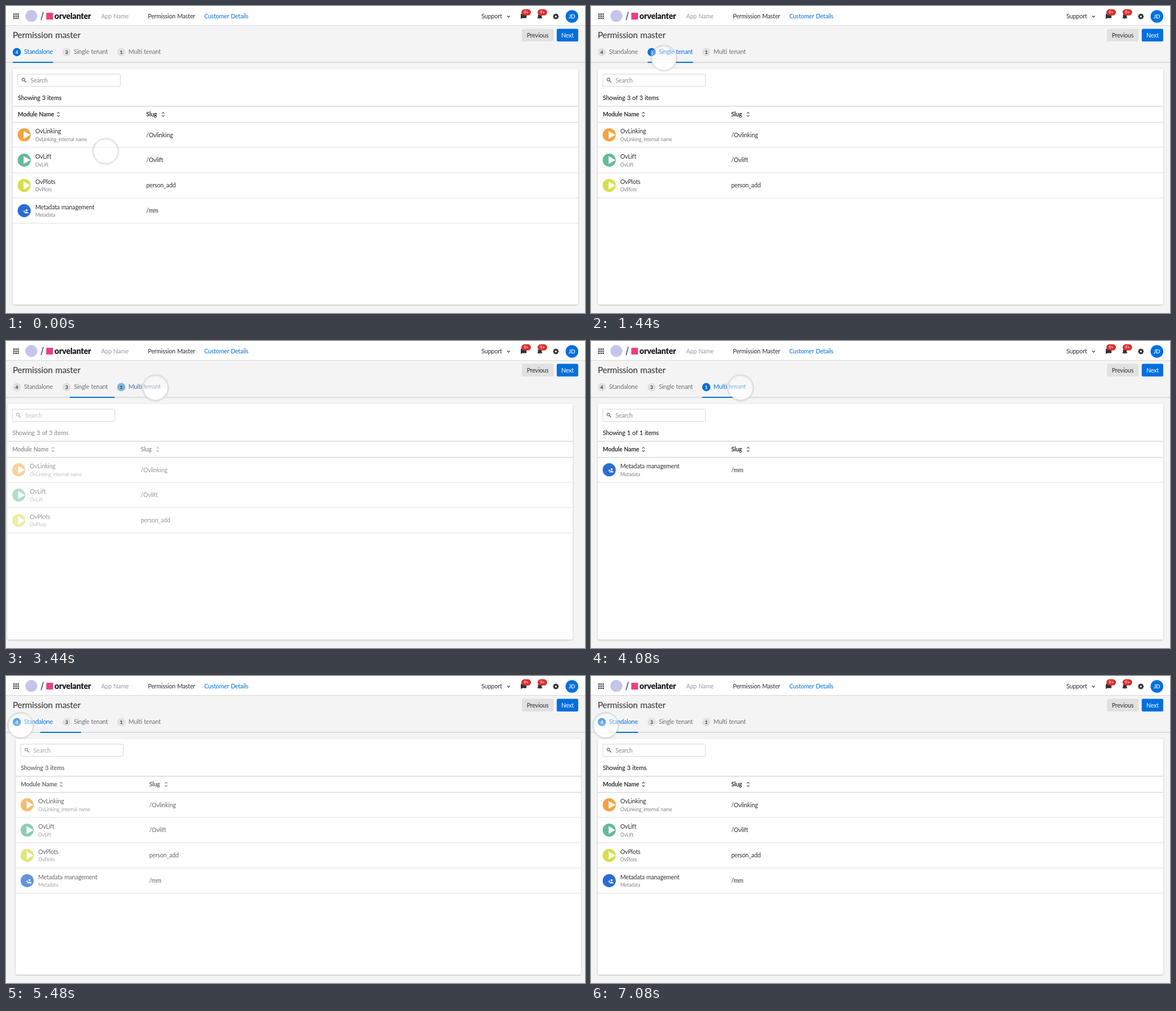
An HTML page for the animation above (7120 ms loop, 1028 by 545 pixels).

```html
<!DOCTYPE html>
<html lang="en">
<head>
<meta charset="utf-8">
<title>Permission master</title>
<style>
  html, body { margin: 0; width: 100%; height: 100%; overflow: hidden; background: #f4f4f4; }
  svg { display: block; width: 1028px; height: 545px; overflow: hidden; }
  text { font-family: Lato, "Open Sans", sans-serif; letter-spacing: -.016em; word-spacing: .07em; white-space: pre; }
  .card { filter: drop-shadow(0 1px 1.5px rgba(0,0,0,.22)); }
  .ring { filter: drop-shadow(0 1px 1px rgba(0,0,0,.25)); }
</style>
</head>
<body>
<svg id="stage" viewBox="0 0 1028 545"></svg>
<script>
const LOOP = 7120, STEP = 40, SWITCH = 400, SLIDE = 19;
const INK = '#2f2f2f', FAINT = '#858585', BLUE = '#0070dd', LINE = '#d8d8d8';

const label = (x, y, s, o = {}) =>
  `<text x="${x}" y="${y}" font-size="${o.size || 10.6}" font-weight="${o.weight || 400}" ` +
  `fill="${o.fill || INK}" text-anchor="${o.anchor || 'start'}">${s}</text>`;
const rect = (x, y, w, h, fill, r = 0, extra = '') =>
  `<rect x="${x}" y="${y}" width="${w}" height="${h}" rx="${r}" fill="${fill}" ${extra}/>`;
const disc = (x, y, r, fill, extra = '') =>
  `<circle cx="${x}" cy="${y}" r="${r}" fill="${fill}" ${extra}/>`;
const path = (d, fill = 'none', stroke = 'none', w = 1) =>
  `<path d="${d}" fill="${fill}" stroke="${stroke}" stroke-width="${w}"/>`;
const at = (x, y, s) => `<g transform="translate(${x} ${y})">${s}</g>`;

const tabs = [
  { name: 'Standalone', count: 4, x: 12, end: 83.5 },
  { name: 'Single tenant', count: 3, x: 100.5, end: 181 },
  { name: 'Multi tenant', count: 1, x: 197.5, end: 272.5 }
];
const modules = [
  { name: 'OvLinking', sub: 'OvLinking_internal name', slug: '/Ovlinking', color: '#f3a440' },
  { name: 'OvLift', sub: 'OvLift', slug: '/Ovlift', color: '#63bb97' },
  { name: 'OvPlots', sub: 'OvPlots', slug: 'person_add', color: '#d4e04c' },
  { name: 'Metadata management', sub: 'Metadata', slug: '/mm', color: '#2b6cd4', person: true }
];
const views = [
  { note: 'Showing 3 items', rows: modules },
  { note: 'Showing 3 of 3 items', rows: modules.slice(0, 3) },
  { note: 'Showing 1 of 1 items', rows: modules.slice(3) }
];

function header() {
  let s = rect(0, 0, 1028, 34, '#fff') + rect(0, 34, 1028, 1, LINE);
  for (let i = 0; i < 9; i++) s += rect(13 + i % 3 * 3.7, 13.2 + (i / 3 | 0) * 3.7, 2.4, 2.4, INK);
  s += disc(45, 17.7, 10.3, '#c5c4ec', 'stroke="#c9cbe0"');
  s += path('M62.3 25L66.3 10.5', 'none', '#333', 1.3);
  s += rect(71.5, 12, 12, 12, '#ee3f80');
  s += label(86, 22.8, 'orvelanter', { size: 14.4, weight: 900, fill: '#1c1c1c' });
  s += label(169, 21.7, 'App Name', { fill: '#9b9b9b' });
  s += label(252, 21.7, 'Permission Master');
  s += label(352, 21.7, 'Customer Details', { fill: BLUE });
  s += label(844, 22.2, 'Support', { size: 10.8 });
  s += path('M889.8 17.3l2.5 2.5 2.5-2.5', 'none', INK, 1.2);
  s += path('M914 14h10v7.5h-8l-2 2z', INK);
  s += path('M943.5 21.8v-1l1-1v-3c0-2 1.3-3 3.3-3s3.3 1 3.3 3v3l1 1v1zM946.6 22.4h2.4l-1.2 1.2z', INK);
  for (const x of [923.5, 952.3]) {
    s += rect(x - 8.5, 5.8, 17, 11, '#d9302f', 5.5);
    s += label(x, 14.2, '9+', { size: 7.6, fill: '#fff', anchor: 'middle' });
  }
  for (let i = 0; i < 4; i++)
    s += rect(975, 13.6, 2.6, 10, INK, .6, `transform="rotate(${i * 45} 976.3 18.6)"`);
  s += disc(976.3, 18.6, 3.8, INK) + disc(976.3, 18.6, 1.7, '#fff');
  s += disc(1004.8, 18.5, 11.3, BLUE);
  s += label(1004.8, 22.1, 'JD', { size: 10, weight: 600, fill: '#fff', anchor: 'middle' });
  s += label(12, 57, 'Permission master', { size: 15.4 });
  s += rect(916, 40.6, 56, 22.5, '#e1e1e1', 2.5) + label(944, 55.6, 'Previous', { anchor: 'middle' });
  s += rect(977.8, 40.6, 38.2, 22.5, BLUE, 2.5) + label(996.9, 55.6, 'Next', { fill: '#fff', anchor: 'middle' });
  s += rect(0, 99.5, 1028, 1.2, '#d0d0d0');
  tabs.forEach((t, i) => {
    s += disc(t.x + 7.2, 81.9, 7.3, '#e0e0e0', `id="dot${i}"`);
    s += `<g id="num${i}">${label(t.x + 7.2, 84.9, t.count, { size: 8.4, weight: 700, fill: 'inherit', anchor: 'middle' })}</g>`;
    s += `<g id="tab${i}">${label(t.x + 20, 85.1, t.name, { size: 10.8, fill: 'inherit' })}</g>`;
  });
  return s + rect(12, 99, 71, 2, BLUE, 0, 'id="bar"');
}

const sorter = x => path(`M${x - 2.2} 190.8l2.2-2.2 2.2 2.2M${x - 2.2} 194l2.2 2.2 2.2-2.2`, 'none', '#555', 1.1);
const rowY = i => 228.7 + i * 44.9;

function row(m, i) {
  const y = rowY(i);
  const icon = m.person
    ? disc(4.2, -.8, 1.8, '#fff') + path('M.6 4.6c0-3.3 7.2-3.3 7.2 0z', '#fff') +
      path('M-1.6 1.3h3.4M.1-.4v3.4', 'none', '#fff', 1)
    : path('M-1-7L11 0-1 7z', '#fff');
  return disc(32.3, y, 11.6, m.color) + at(32.3, y, icon) +
    label(52, y - 2.3, m.name) +
    label(52, y + 10.9, m.sub, { size: 8.7, fill: FAINT }) +
    label(249, y + 3.8, m.slug);
}

function panel(v, i) {
  const sheet = rect(12, 111.5, 1004, 418.5, '#fff', 3, 'class="card"') +
    rect(21, 121, 182, 21.8, '#fff', 2, 'stroke="#d5d5d5"') +
    rect(12, 177.3, 1004, 1.4, LINE) + rect(12, 205.9, 1004, 1.3, LINE) +
    v.rows.map((_, r) => rect(12, rowY(r) + 21.7, 1004, 1.1, '#e3e3e3')).join('');
  const content = disc(30.9, 130.6, 2.5, 'none', 'stroke="#666" stroke-width="1.1"') +
    path('M32.8 132.5l3 3', 'none', '#666', 1.3) +
    label(43.5, 135.6, 'Search', { fill: '#8a8a8a' }) +
    label(21, 167, v.note, { size: 10.8, weight: 600 }) +
    label(21, 196, 'Module Name', { size: 10.4, weight: 700 }) + sorter(93) +
    label(249, 196, 'Slug', { size: 10.4, weight: 700 }) + sorter(279) +
    v.rows.map(row).join('');
  return `<g id="view${i}"><g>${sheet}</g><g>${content}</g></g>`;
}

const pointer = `
  <linearGradient id="glass" x2="0" y2="1">
    <stop offset="0" stop-color="#fff" stop-opacity=".2"/>
    <stop offset=".54" stop-color="#fff" stop-opacity=".5"/>
    <stop offset=".55" stop-color="#fff" stop-opacity=".96"/>
    <stop offset="1" stop-color="#fff" stop-opacity=".96"/>
  </linearGradient>
  <g id="pointer">${disc(0, 0, 22.6, 'url(#glass)')}
  ${disc(0, 0, 22.6, 'none', 'class="ring" stroke="#d2d2d2" stroke-width=".9"')}</g>`;

document.getElementById('stage').innerHTML = header() + views.map(panel).join('') + pointer;
const $ = id => document.getElementById(id);

// time, x, y of the pointer
const route = [
  [0, 177, 257.5], [120, 177, 257.5], [760, 129.5, 92], [1700, 129.5, 92], [2440, 254, 99.5],
  [2960, 265.5, 82.5], [4240, 265.5, 82.5], [4900, 26, 87], [LOOP, 26, 87]
];
const clicks = [{ time: 888, to: 1 }, { time: 3338, to: 2 }, { time: 5225, to: 0 }];

const clamp = v => Math.max(0, Math.min(1, v));
const smooth = v => v * v * (3 - 2 * v);
const easeInOut = v => v < .5 ? 2 * v * v : 1 - 2 * (1 - v) ** 2;
const mix = (a, b, k) => a + (b - a) * k;
const toBlue = (grey, k) => `rgb(${[0, 112, 221].map(v => Math.round(mix(grey, v, k)))})`;

function draw(t) {
  const n = route.findIndex(p => p[0] > t);
  const [a, b] = [route[n - 1], route[n]];
  const k = smooth((t - a[0]) / (b[0] - a[0]));
  $('pointer').setAttribute('transform', `translate(${mix(a[1], b[1], k)} ${mix(a[2], b[2], k)})`);

  let from = 0, to = 0, since = Infinity;
  for (const c of clicks) if (t >= c.time) { from = to; to = c.to; since = t - c.time; }
  const p = clamp(since / SWITCH);

  tabs.forEach((_, i) => {
    let on = 0;
    if (i === from) on = 1 - clamp(since / 50);
    if (i === to) on = clamp((since - 60) / 100);
    $('dot' + i).setAttribute('fill', toBlue(224, on));
    $('num' + i).setAttribute('fill', on > .6 ? '#fff' : INK);
    $('tab' + i).setAttribute('fill', toBlue(112, on));
  });
  const e = easeInOut(p), x = mix(tabs[from].x, tabs[to].x, e);
  $('bar').setAttribute('x', x);
  $('bar').setAttribute('width', mix(tabs[from].end, tabs[to].end, e) - x);

  // the old panel leaves to the left, then the new one settles from the right
  const leaving = p < .5;
  const shown = leaving ? 1 - 2 * p : 1 - (2 - 2 * p) ** 4;
  const shift = (1 - shown) * SLIDE * (leaving ? -1 : 1);
  views.forEach((_, i) => {
    const g = $('view' + i), [sheet, content] = g.children;
    g.style.display = i === (leaving ? from : to) ? '' : 'none';
    g.setAttribute('transform', `translate(${shift} 0)`);
    sheet.setAttribute('opacity', clamp(shown * 2.2));
    content.setAttribute('opacity', shown);
  });
}

const start = performance.now();
function tick() {
  const t = (performance.now() - start) % LOOP;
  draw(Math.floor(t / STEP) * STEP);
  requestAnimationFrame(tick);
}
tick();
</script>
</body>
</html>
```
